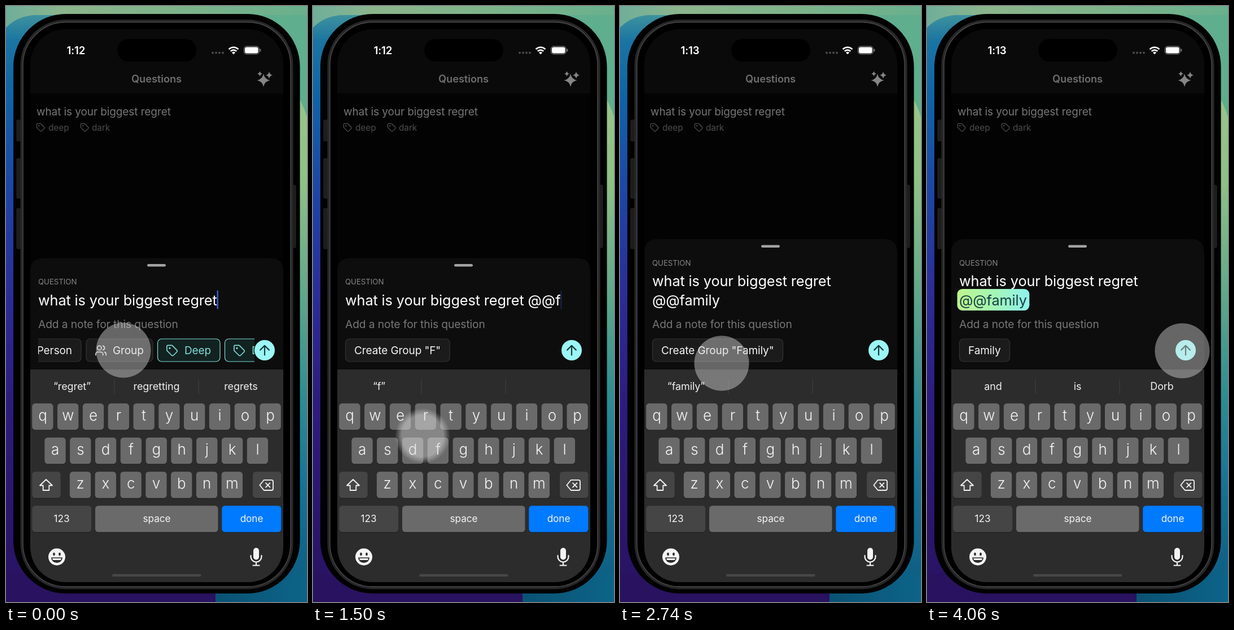
Recreate the animation shown at these times as an HTML page. Size 533 by 1051 pixels, loop 4.08 s.

```html
<!DOCTYPE html>
<html lang="en">
<head>
<meta charset="utf-8">
<title>Tagging a question</title>
<style>
  html, body { margin: 0; width: 100%; height: 100%; overflow: hidden; background: #000; }
  svg { display: block; width: 100%; height: 100%; }
  text { font-family: Inter, Roboto, sans-serif; letter-spacing: -.005em; white-space: pre; }
</style>
</head>
<body>
<svg id="stage" viewBox="0 0 533 1051"></svg>
<script>
const LOOP = 4080;
const svg = document.getElementById('stage');

// Markup helpers
const text = (x, y, s, size, fill, attrs = '') =>
  `<text x="${x}" y="${y}" font-size="${size}" fill="${fill}" ${attrs}>${s}</text>`;
const mid = (x, y, s, size, fill, attrs = '') =>
  text(x, y, s, size, fill, `text-anchor="middle" ${attrs}`);
const box = (x, y, w, h, r, fill, attrs = '') =>
  `<rect x="${x}" y="${y}" width="${w}" height="${h}" rx="${r}" fill="${fill}" ${attrs}/>`;
const gradient = (id, dir, stops) =>
  `<linearGradient id="${id}" x1="0" y1="0" ${dir}>` +
  stops.map(([o, c]) => `<stop offset="${o}" stop-color="${c}"/>`).join('') + '</linearGradient>';
const icon = (x, y, size, color, body, weight = 1.8) =>
  `<g transform="translate(${x} ${y}) scale(${size / 24})" fill="none" stroke="${color}"
    stroke-width="${weight}" stroke-linecap="round" stroke-linejoin="round">${body}</g>`;
const star = (x, y, r) => {
  const k = r * .16;
  return `M${x} ${y - r}Q${x + k} ${y - k} ${x + r} ${y}Q${x + k} ${y + k} ${x} ${y + r}` +
    `Q${x - k} ${y + k} ${x - r} ${y}Q${x - k} ${y - k} ${x} ${y - r}Z`;
};

const TAG = `<path d="M12.6 2.6A2 2 0 0 0 11.2 2H4a2 2 0 0 0-2 2v7.2a2 2 0 0 0 .6 1.4l8.7 8.7
  a2.4 2.4 0 0 0 3.4 0l6.6-6.6a2.4 2.4 0 0 0 0-3.4z"/><circle cx="7.5" cy="7.5" r=".9"/>`;
const USERS = `<path d="M16 21v-2a4 4 0 0 0-4-4H6a4 4 0 0 0-4 4v2M22 21v-2a4 4 0 0 0-3-3.9M16 3.1a4 4 0 0 1 0 7.8"/>
  <circle cx="9" cy="7" r="4"/>`;
const TEAL = '#7fdcd6';

function backdrop() {
  return box(0, 0, 266, 1051, 0, 'url(#left)') +
    box(266, 0, 267, 1051, 0, '#5fae8e') +
    '<path d="M0 0H533V16H50Q20 18 0 38Z" fill="url(#top)"/>' +
    '<path d="M470 100Q520 150 533 196V1051H470Z" fill="url(#right)"/>' +
    '<path d="M0 1000H371V1051H0Z" fill="#29125f"/>' +
    '<path d="M371 1000H533V1051H371Z" fill="url(#floor)"/>';
}

function phone() {
  const buttons = [[19, 201, 37], [19, 269, 70], [19, 357, 71], [506, 316, 110]];
  return box(13, 14, 507.5, 1022, 93, '#020202') +
    buttons.map(([x, y, h]) => box(x, y, 7, h, 1.5, '#1d1d1d', 'stroke="#2b2b2b" stroke-width=".8"')).join('') +
    box(28, 26.5, 478, 999.5, 78, '#000', 'stroke="#272727" stroke-width="5"') +
    box(30, 28.5, 474, 995.5, 76, 'none', 'stroke="#4a4a4a" stroke-width="1.3"') +
    box(43, 41, 448, 975, 62, '#030303');
}

function statusBar() {
  const dots = [0, 1, 2, 3].map(i => `<circle cx="${366 + i * 6}" cy="82.5" r="2" fill="#4b4b4b"/>`).join('');
  return '<path d="M43 154V103A62 62 0 0 1 105 41H429A62 62 0 0 1 491 103V154Z" fill="#0a0a0a"/>' +
    box(197, 58, 140, 40, 20, '#000') +
    text(107.5, 84.5, '', 18.6, '#fff', 'id="clock" font-weight="600"') + dots +
    `<g fill="none" stroke="#fff" stroke-width="2.7"><path d="M394.6 76.2a12 12 0 0 1 16.8 0"/>
      <path d="M397.8 79.8a7.4 7.4 0 0 1 10.4 0"/></g><path d="M400 82.2a4.4 4.4 0 0 1 6 0l-3 3z" fill="#fff"/>` +
    box(421.5, 71, 26.5, 14, 4.5, 'none', 'stroke="#808080" stroke-width="1.2"') +
    box(423, 72.5, 23.5, 11, 3, '#fff') + box(449.3, 75.5, 2, 5, 1, '#777');
}

function list() {
  return mid(266.5, 135, 'Questions', 18.3, '#6e6e6e', 'font-weight="600"') +
    `<path d="${star(456, 131, 11.5) + star(466, 122, 6.2) + star(449.5, 119.5, 4.8)}" fill="#858585"/>` +
    text(54, 192.5, 'what is your biggest regret', 19, '#767676') +
    icon(53, 206, 16.5, '#505050', TAG) + text(75, 219.5, 'deep', 15.4, '#4c4c4c') +
    icon(131, 206, 16.5, '#505050', TAG) + text(152, 219.5, 'dark', 15.4, '#4c4c4c');
}

function chip(x, w, teal) {
  return box(x, 587, w, 40, 7, teal ? '#122221' : '#1b1b1b', `stroke="${teal ? TEAL : '#343434'}" stroke-width="1.2"`);
}

function sheet() {
  return `<path id="panel" fill="#0d0d0d"/>` +
    `<g id="head">${box(250, 455, 33, 4.6, 2.3, '#a3a3a3')}
      ${text(57, 491, 'QUESTION', 13.3, '#858585')}</g>` +
    box(53.5, 499, 0, 38, 9, 'url(#pill)', 'id="pill"') +
    text(57, 527.5, '', 25.3, '#fff', 'id="line1"') +
    text(57, 527.5, '', 25.3, '#fff', 'id="line2"') +
    box(0, 501.5, 2.2, 33, 1, '#3f62e8', 'id="caret"') +
    text(57, 567.5, 'Add a note for this question', 19.2, '#777') +
    `<g id="filters" clip-path="url(#row)">` +
      chip(30, 103) + text(117, 614, 'Person', 19, '#f2f2f2', 'text-anchor="end"') +
      chip(142, 118) + icon(157, 596.5, 22, '#dcdcdc', USERS) + text(189, 614, 'Group', 19, '#f2f2f2') +
      chip(268.5, 110.5, true) + icon(283, 596.5, 22, TEAL, TAG) + text(316, 614, 'Deep', 19, TEAL) +
      chip(387.5, 110, true) + icon(402, 596.5, 22, TEAL, TAG) + text(435, 614, 'Dark', 19, TEAL) +
    `</g><g id="action">${box(57.5, 587, 0, 40, 7, '#1b1b1b', 'id="actionBox" stroke="#343434" stroke-width="1.2"')}
      ${text(73, 614, '', 19, '#f5f5f5', 'id="actionText"')}</g>` +
    `<circle cx="458" cy="607" r="18" fill="#9bf6f5"/>
     <path d="M458 615.5V599M450.2 606.6L458 598.8L465.8 606.6" fill="none" stroke="#16393b"
       stroke-width="2.2" stroke-linecap="round" stroke-linejoin="round"/>`;
}

function key(x, y, w, fill = '#6a6a6a') {
  return box(x, y + 1, w, 46.6, 5.5, '#1a1a1a') + box(x, y, w, 46.6, 5.5, fill);
}

function keyboard() {
  const rows = [['qwertyuiop', 64.9], ['asdfghjkl', 87], ['zxcvbnm', 131.5]];
  let s = '<path d="M43 641H491V954A62 62 0 0 1 429 1016H105A62 62 0 0 1 43 954Z" fill="#2c2c2c"/>';
  s += [192, 341].map(x => box(x - .5, 658, 1, 26, 0, '#404040')).join('');
  s += [117, 266.5, 416].map((x, i) => mid(x, 677, '', 18, '#f0f0f0', `id="hint${i}"`)).join('');
  rows.forEach(([letters, x0], r) => {
    const y = 700.8 + r * 60.2;
    [...letters].forEach((c, i) => {
      const x = x0 + i * 44.8;
      s += key(x - 18.7, y, 37.4) + mid(x, y + 30.2, c, 26, '#f4f4f4', 'font-weight="300"');
    });
  });
  s += key(46.2, 821.2, 50.6, '#454545') + key(437, 821.2, 50.4, '#454545');
  s += key(46.2, 881.2, 105, '#454545') + key(158, 881.2, 217.5) + key(382.2, 881.2, 105.2, '#007aff');
  s += [[98.5, '123'], [267, 'space'], [435, 'done']].map(([x, t]) => mid(x, 910, t, 17.2, '#f4f4f4')).join('');
  s += `<g fill="none" stroke="#f4f4f4" stroke-width="1.8" stroke-linejoin="round" stroke-linecap="round">
    <path d="M71 835L82 845.5H76.3V854H65.7V845.5H60Z"/>
    <path d="M456.8 835.8H470a3 3 0 0 1 3 3V851a3 3 0 0 1-3 3H456.8L449.3 845Z"/>
    <path d="M460 841.2L467.4 848.6M467.4 841.2L460 848.6"/>
    <path stroke-width="2.2" d="M433.5 969v2a9.5 9.5 0 0 0 19 0v-2M443 981v5M437.5 986.5H448.5"/></g>`;
  s += box(438, 955.5, 10, 21, 5, '#f4f4f4');
  s += `<circle cx="90" cy="971.5" r="15" fill="#f4f4f4"/>
    <g fill="#2c2c2c"><ellipse cx="85" cy="966.5" rx="1.9" ry="2.7"/><ellipse cx="95" cy="966.5" rx="1.9" ry="2.7"/>
    <path d="M80 972.5H100A10 9.5 0 0 1 80 972.5Z"/></g>
    <path d="M82 974H98L97 977H83Z" fill="#f4f4f4"/>`;
  return s + box(188, 1001.8, 157.5, 4.4, 2.2, '#474747');
}

svg.innerHTML = `<defs>
  ${gradient('left', 'x2="0" y2="1"', [[0, '#4a9c9c'], [.06, '#1a74a2'], [.15, '#0f64a8'], [.32, '#1e44a6'], [.48, '#2c2d98'], [.66, '#2d1c80'], [1, '#29125f']])}
  ${gradient('right', 'x2="0" y2="1"', [[0, '#9cc68a'], [.22, '#8fc186'], [.42, '#62a98b'], [.62, '#2f8c92'], [.78, '#187395'], [1, '#0b5a80']])}
  ${gradient('top', 'x2="1" y2="0"', [[0, '#6fae9a'], [.2, '#8cb58d'], [.55, '#7fb48a'], [1, '#69b08d']])}
  ${gradient('floor', 'x2="1" y2="0"', [[0, '#0a5274'], [1, '#0c6488']])}
  ${gradient('pill', 'x2="1" y2="0"', [[0, '#bdf58d'], [.5, '#a4f5b4'], [1, '#8ff3ee']])}
  <radialGradient id="spot"><stop id="rim" stop-color="#e0e0e0"/>
    <stop offset="1" stop-color="#e0e0e0" stop-opacity="0"/></radialGradient>
  <clipPath id="row"><rect x="57" y="580" width="383" height="54"/></clipPath>
</defs>` + backdrop() + phone() + statusBar() + list() + sheet() + keyboard() +
  '<circle id="touch" r="49" fill="url(#spot)"/>';

const el = {};
svg.querySelectorAll('[id]').forEach(n => el[n.id] = n);

// Typed tail after the question, each with its start time
const QUESTION = 'what is your biggest regret';
const STEPS = [[0, ''], [300, '@@'], [1360, '@@f'], [1640, '@@fa'], [1880, '@@fam'],
  [2080, '@@fami'], [2300, '@@famil'], [2540, '@@family']];
const WRAP = 1880, TAGGED = 2930, NEXT_WORD = 3500, NEW_MINUTE = 1800;

// time, x, y, softness of the rim
const TOUCH = [[0, 208, 607, 0], [940, 206, 607, 0], [1080, 206, 607, 0], [1340, 220, 780, 1],
  [1410, 220, 780, 1], [1500, 194, 758, 1], [1640, 88, 782, 1], [1860, 400, 842, 1],
  [2060, 379, 723, 1], [2120, 379, 726, 1], [2290, 444, 782, 1], [2510, 290, 724, 1],
  [2740, 180, 630, 0], [2860, 180, 612, 0], [3010, 183, 608, 0], [3300, 235, 605, 0],
  [3780, 452, 608, 0], [LOOP, 452, 608, 0]];
const CARET = [[0, 1], [1000, 1], [1360, .9], [1500, .25], [1640, .9], [2060, .9], [2120, .5],
  [2300, .9], [2540, .9], [2700, 0], [2900, 0], [2960, .9], [3250, .9], [3300, .75], [3450, 0],
  [3650, 0], [3750, .9], [3900, .9], [4040, 0], [LOOP, 0]];

function sample(keys, t) {
  const i = Math.max(1, keys.findIndex(k => k[0] > t));
  const a = keys[i - 1], b = keys[i];
  const p = (t - a[0]) / (b[0] - a[0]), e = p * p * (3 - 2 * p);
  return a.slice(1).map((v, j) => v + (b[j + 1] - v) * e);
}

function hints(t, name, tail) {
  if (t >= NEXT_WORD) return ['and', 'is', 'Dorb'];
  if (name) return [`“${name}”`, '', ''];
  return tail ? ['about', 'in', 'is'] : ['“regret”', 'regretting', 'regrets'];
}

const set = (node, attrs) => { for (const k in attrs) node.setAttribute(k, attrs[k]); };
const width = node => node.textContent ? node.getComputedTextLength() : 0;

function draw(t) {
  const tail = STEPS.filter(s => s[0] <= t).pop()[1];
  const name = tail.slice(2), wrapped = t >= WRAP, tagged = t >= TAGGED;
  const lift = wrapped ? 33.5 : 0, top = 444.5 - lift;

  el.clock.textContent = t < NEW_MINUTE ? '1:12' : '1:13';
  el.panel.setAttribute('d', `M43 642V${top + 24}Q43 ${top} 67 ${top}H467Q491 ${top} 491 ${top + 24}V642Z`);
  el.head.setAttribute('transform', `translate(0 ${-lift})`);

  el.line1.textContent = QUESTION + (tail && !wrapped ? ' ' + tail : '');
  el.line1.setAttribute('y', 527.5 - lift);
  el.line2.textContent = wrapped ? tail : '';
  el.line2.setAttribute('fill', tagged ? '#173f42' : '#fff');
  const end = width(wrapped ? el.line2 : el.line1);
  set(el.pill, { width: tagged ? end + 8 : 0 });
  set(el.caret, { x: 57 + end + (tagged ? 7 : 0), opacity: sample(CARET, t)[0] });

  el.filters.style.display = tail ? 'none' : '';
  el.action.style.display = tail ? '' : 'none';
  const title = name && name[0].toUpperCase() + name.slice(1);
  el.actionText.textContent = tagged ? title : `Create Group "${title}"`;
  if (tail) set(el.actionBox, { width: width(el.actionText) + 31.5 });

  hints(t, name, tail).forEach((h, i) => el['hint' + i].textContent = h);
  const [cx, cy, soft] = sample(TOUCH, t);
  set(el.touch, { cx, cy, opacity: .42 + .08 * soft });
  set(el.rim, { offset: .98 - .23 * soft });
}

const start = performance.now();
function tick() {
  draw((performance.now() - start) % LOOP);
  requestAnimationFrame(tick);
}
tick();
</script>
</body>
</html>
```
